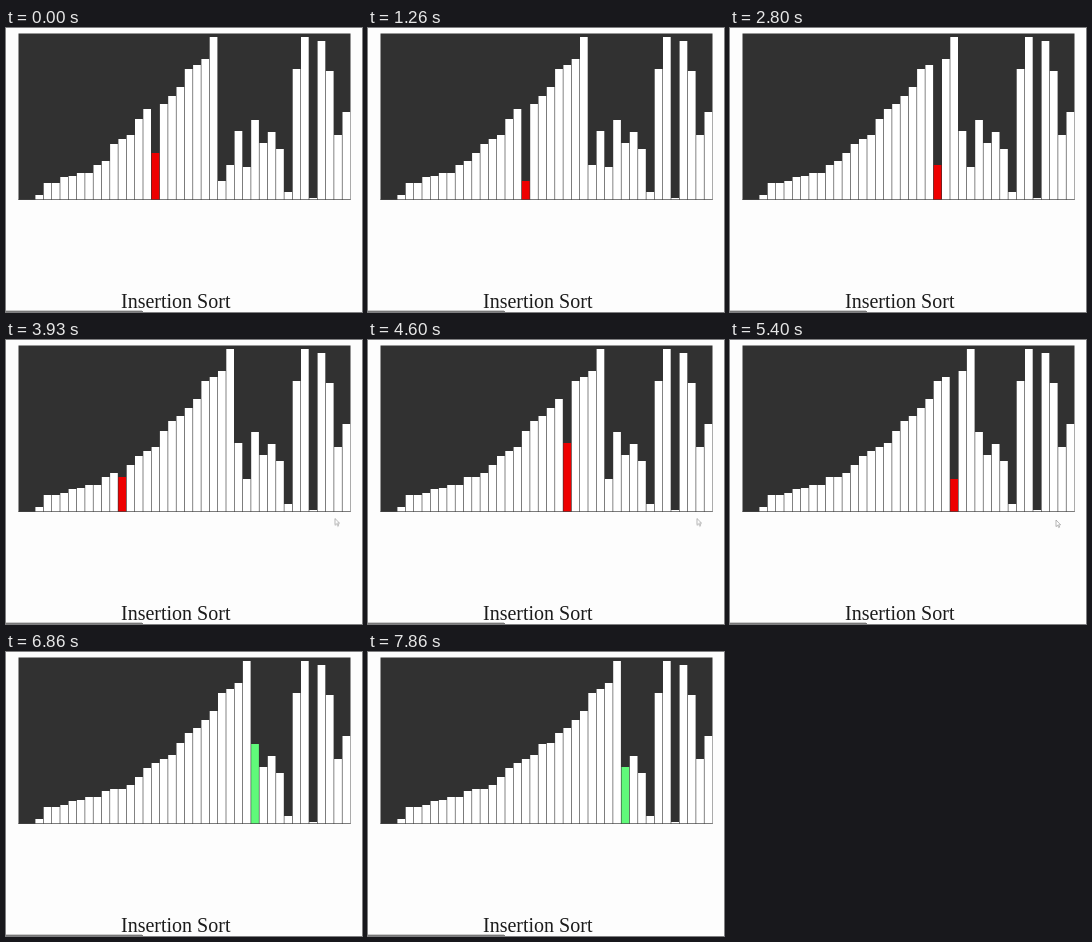
Write an HTML page with a canvas that moves like this. It is 356 px wide and 284 px high and loops after 8000 ms.

```html
<!DOCTYPE html>
<html lang="en">
<head>
<meta charset="utf-8">
<title>Insertion Sort</title>
<style>
  html, body { margin: 0; width: 100%; height: 100%; overflow: hidden; background: #fdfdfd; }
  canvas, svg { position: absolute; left: 0; top: 0; width: 356px; height: 284px; }
  text { font: 20px "Liberation Serif", "Times New Roman", serif; fill: #1c1c1c; }
  #cursor { visibility: hidden; animation: roam 8s infinite; }
  @keyframes roam {
    0%, 39% { visibility: hidden; transform: translate(349px, 180px); }
    39.1% { visibility: visible; transform: translate(349px, 180px); }
    46%, 58% { visibility: visible; transform: translate(329px, 178.5px); }
    63%, 83% { visibility: visible; transform: translate(326px, 180px); }
    83.1%, 100% { visibility: hidden; transform: translate(326px, 180px); }
  }
</style>
</head>
<body>
<canvas id="chart" width="356" height="284"></canvas>
<svg viewBox="0 0 356 284">
  <text x="115" y="280">Insertion Sort</text>
  <rect y="282" width="136" height="1" fill="#ccc"/>
  <rect y="283" width="137" height="1" fill="#777"/>
  <path id="cursor" d="M0 0V6.6L1.6 5.2L2.7 7.6L3.7 7.1L2.6 4.8H4.6Z"
        fill="#fff" stroke="#888" stroke-width=".6"/>
</svg>
<script>
const LOOP = 8000, FPS = 15;
const LEFT = 12.5, TOP = 5.5, BASE = 172, BAR = 8.3;
const ctx = document.getElementById('chart').getContext('2d');

// Bar heights when the loop begins: a sorted run, then the rest
const heights = [
  0, 0, 5, 17, 17, 23, 24, 27, 27, 35, 39, 56, 61, 65, 81, 91, 47, 96, 104, 113, 131, 135, 141, 163,
  19, 35, 69, 33, 80, 57, 68, 51, 8, 131, 163, 2, 159, 129, 65, 88];

// [ms, steps done]: about ten steps a second
const pace = [[0, 0.5], [1260, 13.3], [5400, 53.8], [6860, 69.1], [LOOP, 80.5]];

function stepsAt(ms) {
  const i = pace.findIndex(([end]) => ms < end);
  const [t0, s0] = pace[i - 1], [t1, s1] = pace[i];
  return Math.floor(s0 + (s1 - s0) * (ms - t0) / (t1 - t0));
}

function sortTo(steps) {
  const bars = heights.slice();
  let next = 23, pos = 16, moving = true;
  while (steps-- > 0) {
    moving = pos > 0 && bars[pos - 1] > bars[pos];
    if (moving) {
      [bars[pos - 1], bars[pos]] = [bars[pos], bars[pos - 1]];
      pos--;
    } else {
      pos = ++next;
    }
  }
  return { bars, pos, color: moving ? '#ee0000' : '#60fa7a' };
}

function draw(steps) {
  const { bars, pos, color } = sortTo(steps);
  const width = BAR * bars.length;
  ctx.clearRect(0, 0, 356, 284);
  ctx.fillStyle = '#313131';
  ctx.fillRect(LEFT, TOP, width, BASE - TOP);
  bars.forEach((h, i) => {
    ctx.fillStyle = i === pos ? color : '#fff';
    ctx.fillRect(LEFT + i * BAR + 0.3, BASE - h, BAR - 0.6, h);
  });
  ctx.fillStyle = '#444';
  ctx.fillRect(LEFT, BASE - 0.7, width, 0.7);
}

let origin, last;
function loop(now) {
  origin ??= now;
  const tick = Math.floor(((now - origin) % LOOP + 7) * FPS / 1000) % (LOOP * FPS / 1000);
  if (tick !== last) {
    last = tick;
    draw(stepsAt(tick * 1000 / FPS));
  }
  requestAnimationFrame(loop);
}
draw(0);
requestAnimationFrame(loop);
</script>
</body>
</html>
```
